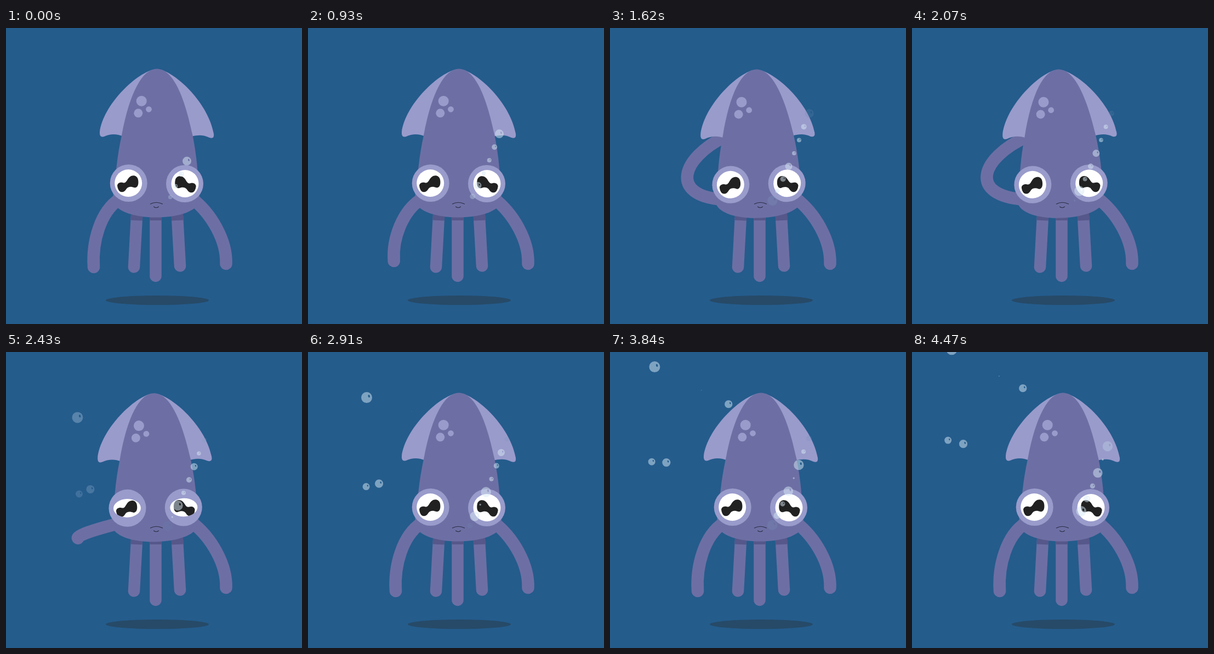
These frames come from a looping animation (540x540 px, 4.5 s). An HTML page with a canvas:

```html
<!DOCTYPE html>
<html>
<head>
<meta charset="utf-8">
<title>Squid</title>
<style>
  html, body { margin: 0; width: 100%; height: 100%; overflow: hidden; background: #245c8c; }
  canvas { display: block; width: 100vw; height: 100vh; }
</style>
</head>
<body>
<canvas id="stage" width="540" height="540"></canvas>
<script>
const ctx = document.getElementById('stage').getContext('2d');
const LOOP = 4500;
const SEA = '#245c8c', SKIN = '#6d6fa4', PALE = '#999bcb', SHADE = '#56578a';
const INK = '#212121', MOUTH = '#2c2d45';

const clamp = v => Math.max(0, Math.min(1, v));
const progress = (t, from, to) => clamp((t - from) / (to - from));
const easeIn = p => p * p;
const easeOut = p => p * (2 - p);
const smooth = p => p * p * (3 - 2 * p);
const blend = (a, b, p) => a.map((v, i) => v + (b[i] - v) * p);

function ellipse(x, y, rx, ry, color) {
  ctx.fillStyle = color;
  ctx.beginPath();
  ctx.ellipse(x, y, rx, ry, 0, 0, 7);
  ctx.fill();
}
const disc = (x, y, r, color) => ellipse(x, y, r, r, color);

function stroke(path, width, color, cap = 'round') {
  ctx.lineWidth = width;
  ctx.lineCap = cap;
  ctx.strokeStyle = color;
  ctx.stroke(new Path2D(path));
}
function fill(path, color) {
  ctx.fillStyle = color;
  ctx.fill(new Path2D(path));
}

// A bubble has a small glint cut out at its upper right.
function bubble(x, y, r, strength) {
  if (strength <= 0) return;
  const mix = (a, b) => Math.round(a + (b - a) * strength);
  ctx.fillStyle = `rgba(${mix(70, 216)},${mix(105, 234)},${mix(155, 245)},${0.12 + 0.38 * strength})`;
  ctx.beginPath();
  ctx.arc(x, y, r, 0, 7);
  ctx.closePath();
  if (r > 2.5) {
    const gx = x + r * 0.42, gy = y - r * 0.25;
    ctx.moveTo(gx, gy);
    ctx.ellipse(gx, gy, r * 0.17, r * 0.26, -0.3, 0, 7);
  }
  ctx.fill('evenodd');
}

// The rising stream releases one bubble every 0.45 s.
const streamSizes = [8, 5, 4, 3.8, 6.5, 5, 4, 9.2, 1.7, 8.7, 4.6, 6.2, 9.3];
function drawStream(t) {
  streamSizes.forEach((r, n) => {
    const age = t / 1000 + 1.64 - 0.45 * n;
    if (age < -0.1 || age > 3.4) return;
    const a = Math.max(0, age);
    const rise = 54 * a - 14 * (1 - Math.exp(-2 * a));
    const x = 295 + 0.424 * rise + 3.2 * Math.sin(Math.PI * Math.min(1, rise / 140));
    bubble(x, 318 - rise, r, clamp((age + 0.1) / 0.55) * clamp((3.4 - age) / 0.55));
  });
}

// Bubbles flung left: sideways drift dies out, lift is steady plus an initial push.
const drifters = [
  { r: 10, x: 130.5, y: 119.5, drift: 71, lift: 40, push: 52 },
  { r: 6.5, x: 133.5, y: 259, drift: 83, lift: 76, push: -70 },
  { r: 7.6, x: 154, y: 250.5, drift: 74, lift: 67, push: -66 },
  { r: 0.9, x: 209.5, y: 127.7, drift: 62, lift: 41, push: 0 },
  { r: 7.2, x: 293, y: 160, drift: 111, lift: 46, push: 0 }
];
function drawDrifters(t) {
  const age = (t - 2430) / 1000, spent = 1 - Math.exp(-age / 1.2);
  for (const { r, x, y, drift, lift, push } of drifters) {
    bubble(x - drift * spent, y - lift * age - push * spent, r, clamp((t - 2250) * r / 2600));
  }
}

// Control points of the waving arm.
const REST = [207, 312, 172, 335, 157, 390, 160, 436];
const OUT = [205, 313, 180, 319, 128, 333, 131, 339];
const SCRATCH = [205, 313, 109, 306, 129, 238, 210, 198];

function drawArm(t) {
  const reach = easeIn(progress(t, 750, 1290)) * easeIn(1 - progress(t, 2430, 2690));
  const curl = easeOut(progress(t, 1290, 1560)) * easeOut(1 - progress(t, 2180, 2430));
  const rub = Math.sin(progress(t, 1620, 2160) * Math.PI * 2) ** 2;
  const p = blend(blend(REST, OUT, reach), SCRATCH, curl);
  p[2] -= 8 * rub;
  p[4] -= 8 * rub;
  stroke(`M${p[0]} ${p[1]}C${p.slice(2).join(' ')}`, 22.5, SKIN);
}

function drawLegs() {
  stroke('M338 310C375 338 403 388 401.5 430', 22.5, SKIN);
  for (const [x, endX, endY] of [[239, 233.5, 436], [273, 273, 452.5], [312, 317.5, 434]]) {
    const slant = (endX - x) / (endY - 335);
    stroke(`M${x} 335L${endX} ${endY}`, 21.5, SKIN);
    stroke(`M${x} 335L${x + slant * 16} 351`, 21.5, SHADE, 'butt');
  }
}

function drawEye(x, y, side, open) {
  disc(x, y, 34, PALE);
  ctx.save();
  ctx.beginPath();
  ctx.ellipse(x - side * 0.5, y, 25, 25 * open, 0, 0, 7);
  ctx.clip();
  disc(x, y, 27, '#fff');
  ctx.translate(x - side * 1.2, y + 0.8);
  ctx.scale(side, 1);
  fill('M-19.5 4C-19 -1 -14 -3 -9 -1.5C-3 0 -2 -7 2 -11C8 -17 17 -15 18.5 -7' +
    'C20 1 18 8 12 7.5C6 5 0 5 -3 10C-7 17 -14 17 -17 12Q-19 9 -19.5 4Z', INK);
  ctx.restore();
}

function drawHead(t) {
  const lean = smooth(progress(t, 1000, 1560)) - smooth(progress(t, 2265, 2690));
  const open = 1 - 0.92 * Math.sin(Math.PI * progress(t, 2380, 2630)) ** 2;
  ctx.save();
  ctx.transform(1, -0.034 * lean, 0.026 * lean, 1, -10.7 * lean, 10.4 * lean);
  fill('M268 76C235 85 178 140 171 189.5Q170 201 179 198C190 193 202 192.5 214 198L275 150Z', PALE);
  fill('M283 76C318 88 370 141 379 193Q380.500 203 371 200C361 195 351 194.5 338 198L275 150Z', PALE);
  fill('M275 74.500C300 74.500 322.500 110 340.500 196C345 218 348.500 245 349.500 262' +
    'C352 285 354 300 352 318C345 336 312 345.500 273 345.500C235 345.500 203 335 196 318' +
    'C194 300 199 275 202 250C204 232 207 214 211 196C226 115 250 74.500 275 74.500Z', SKIN);
  disc(247.2, 133.3, 9.5, PALE);
  disc(260.5, 148.3, 5.4, PALE);
  disc(241.3, 155.3, 8, PALE);
  drawEye(223.7, 283, 1, open);
  drawEye(326, 284, -1, open);
  ctx.restore();
  stroke('M263.500 321Q274 315.500 285.500 321', 1.2, MOUTH);
  stroke('M269.500 326Q274 329.500 278.500 326', 1.1, MOUTH);
}

function draw(t) {
  ctx.fillStyle = SEA;
  ctx.fillRect(0, 0, 540, 540);
  ellipse(276, 496.7, 94, 8.6, '#264a68');
  drawDrifters(t);
  drawArm(t);
  drawLegs();
  drawHead(t);
  drawStream(t);
}

const start = performance.now();
function tick() {
  draw((performance.now() - start) % LOOP);
  requestAnimationFrame(tick);
}
tick();
</script>
</body>
</html>
```
